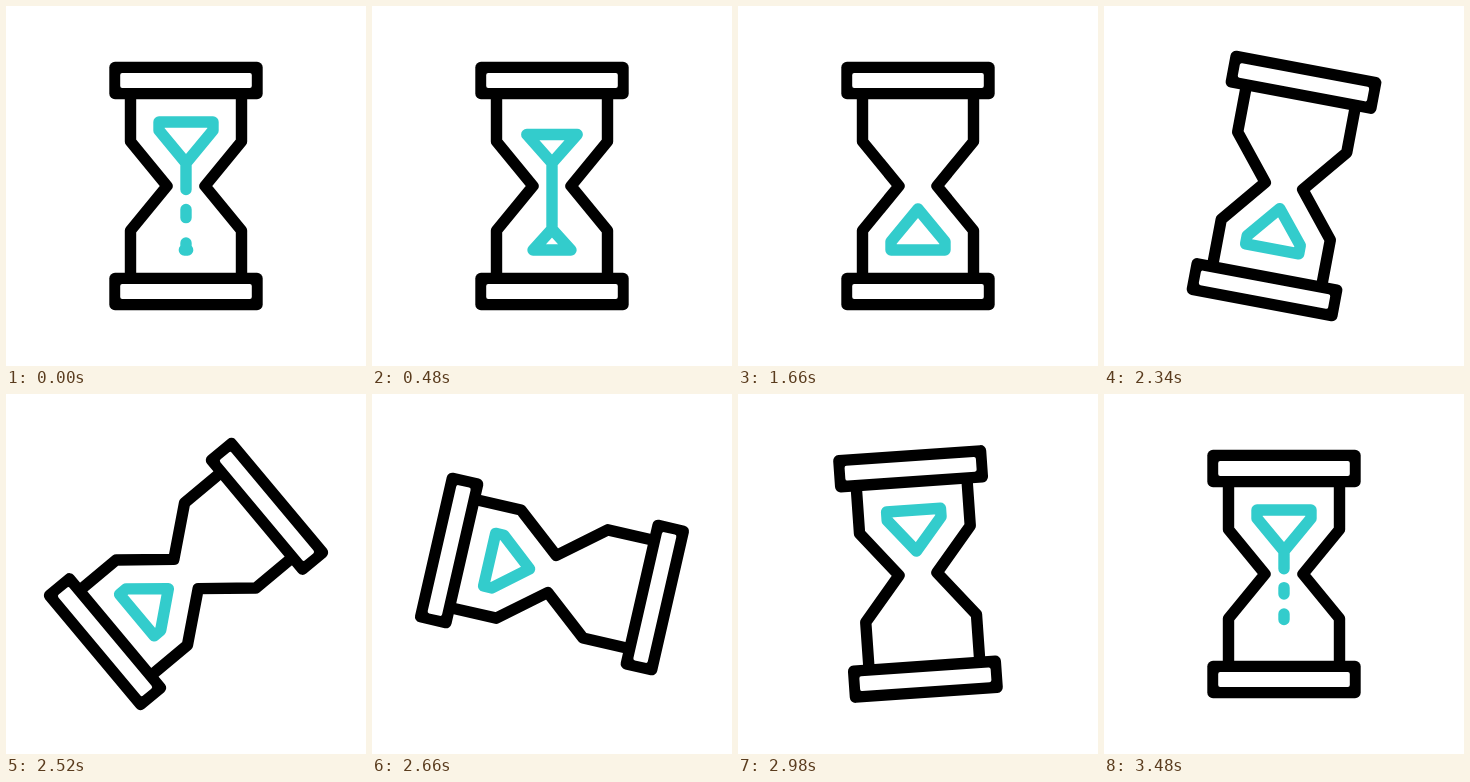
Animation, 360 px wide and 360 px high, one loop 3500 ms. Source, as an HTML page:

```html
<!DOCTYPE html>
<html lang="en">
<head>
<meta charset="utf-8">
<title>Hourglass</title>
<style>
  html, body { margin: 0; height: 100%; overflow: hidden; background: #fff; }
  svg { display: block; width: 100%; height: 100%; }
  path { fill: none; stroke: #000; stroke-width: 11.4; stroke-linecap: round; stroke-linejoin: round; }
  #sand { stroke: #3cc; }
</style>
</head>
<body>
<svg viewBox="-180 -180 360 360">
  <defs>
    <g id="bar">
      <rect x="-76.7" y="-18.7" width="153.4" height="37.4" rx="5.7"/>
      <rect x="-65.8" y="-7.4" width="131.6" height="14.8" rx="2" fill="#fff"/>
    </g>
  </defs>
  <g id="glass">
    <path d="M-55.5-92.5V-44.5L-19 0L-55.5 44.5V92.5M55.5-92.5V-44.5L19 0L55.5 44.5V92.5"/>
    <use href="#bar" y="-105.5"/>
    <use href="#bar" y="105.5"/>
    <path id="sand"/>
  </g>
</svg>
<script>
const LOOP = 3500, FLOW_START = 3240, TURN_START = 2165, TURN_TIME = 929;
const NECK = -23, FLOOR = 64, FULL = 41, SLOPE = 0.83, HALF_WIDTH = 27;
const glass = document.getElementById('glass');
const sand = document.getElementById('sand');

const clamp = x => Math.min(1, Math.max(0, x));
const easeIn = x => (2 * x) ** 2.2 / 2;
const easeInOut = x => x < 0.5 ? easeIn(x) : 1 - easeIn(1 - x);

// Triangle with clipped corners; dir is 1 when the base lies below the apex
function heap(apex, height, dir) {
  if (height <= 0) return '';
  const w = Math.min(HALF_WIDTH, SLOPE * height + 1.6);
  const side = apex + dir * Math.min(height, w / SLOPE);
  return `M0 ${apex}L${w} ${side}V${apex + dir * height}H${-w}V${side}Z`;
}

function fall(from, to, floor) {
  return from < floor ? `M0 ${from}V${Math.min(to, floor)}` : '';
}

// Time is negative while the first drops form before the loop restarts
function sandPath(time) {
  const left = FULL * (1 - clamp(time / 1570));
  const pile = FULL * (1 - (1 - clamp(time / 1600)) ** 2);
  const top = FLOOR - pile;
  const q = Math.max(0, 1 + time / 260);
  const drop = (a, b) => fall(NECK + a * q ** 3, NECK + b * q ** 3, top);
  const tail = NECK + 46 * clamp((time - 1540) / 85) ** 2;
  return heap(NECK, left, -1) + heap(top, pile, 1) +
    fall(tail, NECK + 26 * q ** 5, top) + drop(46, 54) + drop(79, 86);
}

function draw(now) {
  const t = now % LOOP;
  const flowing = t >= FLOW_START;
  const angle = flowing ? 0 : 180 * easeInOut(clamp((t - TURN_START) / TURN_TIME));
  glass.setAttribute('transform', `rotate(${angle})`);
  sand.setAttribute('d', sandPath(flowing ? t - LOOP : t));
}

const start = performance.now();
function tick() {
  draw(performance.now() - start);
  requestAnimationFrame(tick);
}
tick();
</script>
</body>
</html>
```
